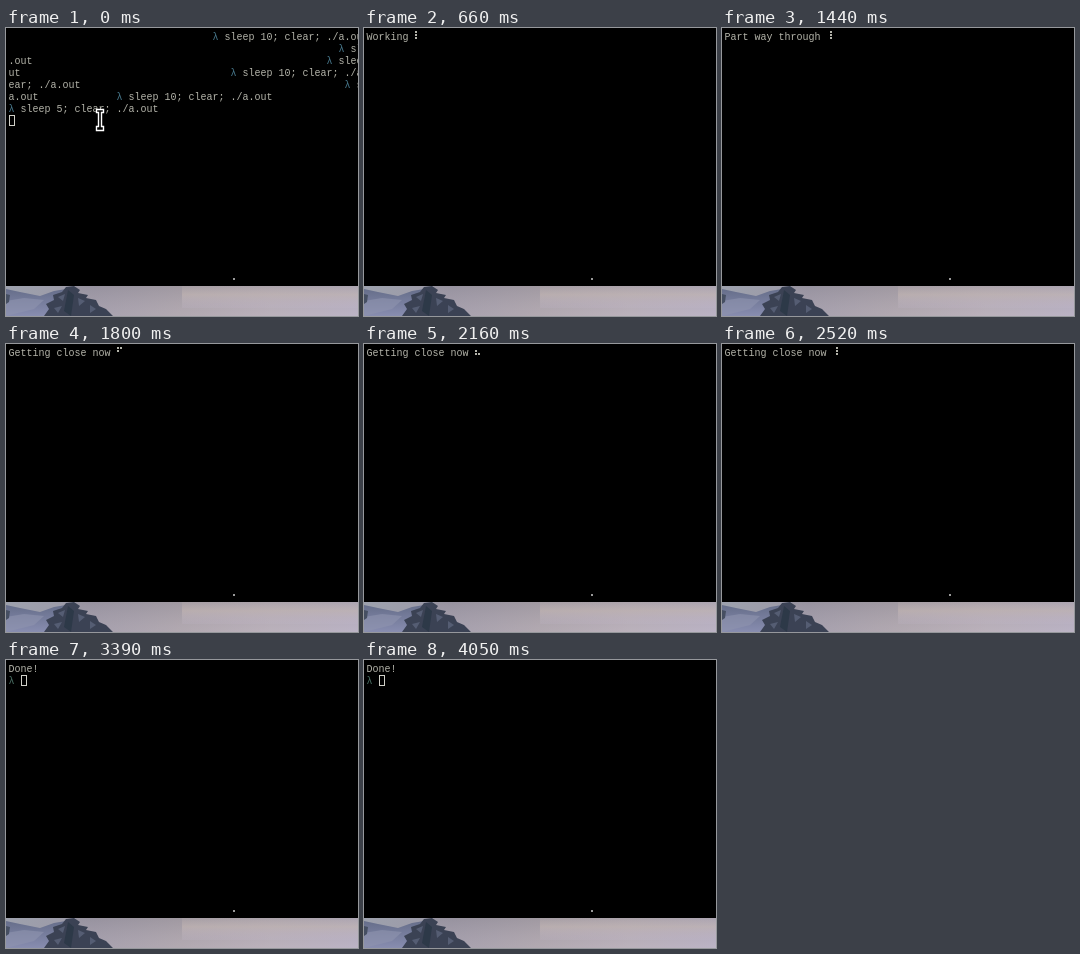
An HTML page that plays this animation: 352x288 px, repeating every 4.08 s.

```html
<!DOCTYPE html>
<html lang="en">
<head>
<meta charset="utf-8">
<title>Terminal spinner</title>
<style>
  html, body { margin: 0; width: 100%; height: 100%; overflow: hidden; background: #000; }
  svg { display: block; width: 352px; height: 288px; }
  text { font: 10px "Liberation Mono", monospace; fill: #b4b4aa; white-space: pre; }
  .prompt { fill: #47788c; }
  .done .prompt { fill: #4b7065; }
</style>
</head>
<body>
<svg viewBox="0 0 352 288">
  <defs>
    <linearGradient id="sky">
      <stop offset="0" stop-color="#9da1ad"/>
      <stop offset=".25" stop-color="#9c98a6"/>
      <stop offset=".5" stop-color="#aca4aa"/>
      <stop offset=".75" stop-color="#b9b0b9"/>
      <stop offset="1" stop-color="#b9b2c6"/>
    </linearGradient>
    <linearGradient id="haze" x2="0" y2="1">
      <stop offset="0" stop-color="#918b96" stop-opacity=".45"/>
      <stop offset="1" stop-color="#c1b6c2" stop-opacity=".3"/>
    </linearGradient>
    <linearGradient id="cloud" x2="0" y2="1">
      <stop offset="0" stop-color="#c4b7b4" stop-opacity=".15"/>
      <stop offset=".4" stop-color="#c4b7b4" stop-opacity=".6"/>
      <stop offset="1" stop-color="#c4b9cc" stop-opacity=".15"/>
    </linearGradient>
    <linearGradient id="slope" x2="0" y2="1">
      <stop offset="0" stop-color="#666e8a"/>
      <stop offset="1" stop-color="#888db0"/>
    </linearGradient>
  </defs>
  <rect width="352" height="288"/>
  <g id="screen"></g>
  <rect x="227" y="250" width="2" height="2" fill="#999"/>
  <g id="wallpaper">
    <rect y="258" width="352" height="30" fill="url(#sky)"/>
    <rect x="70" y="258" width="282" height="30" fill="url(#haze)"/>
    <rect x="176" y="258" width="176" height="22" fill="url(#cloud)"/>
    <path d="M0 261L14 264L34 268L48 263L60 261V288H0Z" fill="url(#slope)"/>
    <path d="M0 273L18 270L38 272L28 281L0 288Z" fill="#9094b0" opacity=".6"/>
    <path d="M0 266L4 267L3 274L0 276Z" fill="#464f62"/>
    <path d="M38 288L43 281L40 276L48 272L47 267L56 264L60 259L68 258L74 262L72 265L82 267L80 270L90 272L93 278L100 281L107 288Z" fill="#3b4254"/>
    <path d="M52 269L59 266L57 273ZM72 270L79 273L73 278ZM48 280L56 278L52 285ZM84 277L90 281L84 285Z" fill="#555d73"/>
    <path d="M62 262L68 267L65 288L58 283Z" fill="#2d3948"/>
  </g>
</svg>
<script>
const LOOP = 4080, TICK = 30;
const CELL = 6, LINE = 12, LEFT = 3;
const START = 300, STAGE = 750, SPIN = 90;
const STAGES = ["Working", "Part way through", "Getting close now"];
// Braille dot numbers: 1-3 down the left column, 4-6 down the right.
const SPINNER = ["124", "145", "456", "356", "236", "123"];
const screen = document.getElementById("screen");

const x = col => LEFT + col * CELL;
const write = (col, row, text, type = "") =>
  `<text class="${type}" x="${x(col) - .5}" y="${(row + 1) * LINE}">${text}</text>`;
const command = (col, row, seconds) =>
  write(col, row, "λ", "prompt") + write(col + 2, row, `sleep ${seconds}; clear; ./a.out`);
const cursor = (col, row) =>
  `<rect x="${x(col) + .5}" y="${row * LINE + 3.5}" width="5" height="10" fill="none" stroke="#d0d0c8"/>`;

function history() {
  const tails = [".out", "ut", "ear; ./a.out", "a.out"];
  const indents = [34, 55, 53, 37, 56, 18];
  const pointer = `<path d="M90.5 81.5H97.5V84.5H95.5V98.5H97.5V102.5H90.5V98.5H92.5V84.5H90.5Z"
    fill="#000" stroke="#fff" stroke-width="1.4"/>`;
  return indents.map((col, row) => command(col, row, 10)).join("")
    + tails.map((text, i) => write(0, i + 2, text)).join("")
    + command(0, 6, 5) + cursor(0, 7) + pointer;
}

function spinner(col, t) {
  const dots = SPINNER[(Math.floor(t / SPIN) + 4) % SPINNER.length];
  return [...dots].map(n => {
    const i = n - 1;
    return `<rect x="${x(col) + (i > 2 ? 3 : 0)}" y="${3 + i % 3 * 3}" width="2" height="2" fill="#b4b4aa"/>`;
  }).join("");
}

function view(t) {
  if (t < START) return history();
  const label = STAGES[Math.floor((t - START) / STAGE)];
  if (label) return write(0, 0, label) + spinner(label.length + 1, t);
  return `<g class="done">${write(0, 0, "Done!")}${write(0, 1, "λ", "prompt")}${cursor(2, 1)}</g>`;
}

let shown = "";
function render(now) {
  const t = Math.floor(now % LOOP / TICK) * TICK;
  const next = view(t);
  if (next !== shown) screen.innerHTML = shown = next;
}

const began = performance.now();
function frame() {
  render(performance.now() - began);
  requestAnimationFrame(frame);
}
frame();
</script>
</body>
</html>
```
